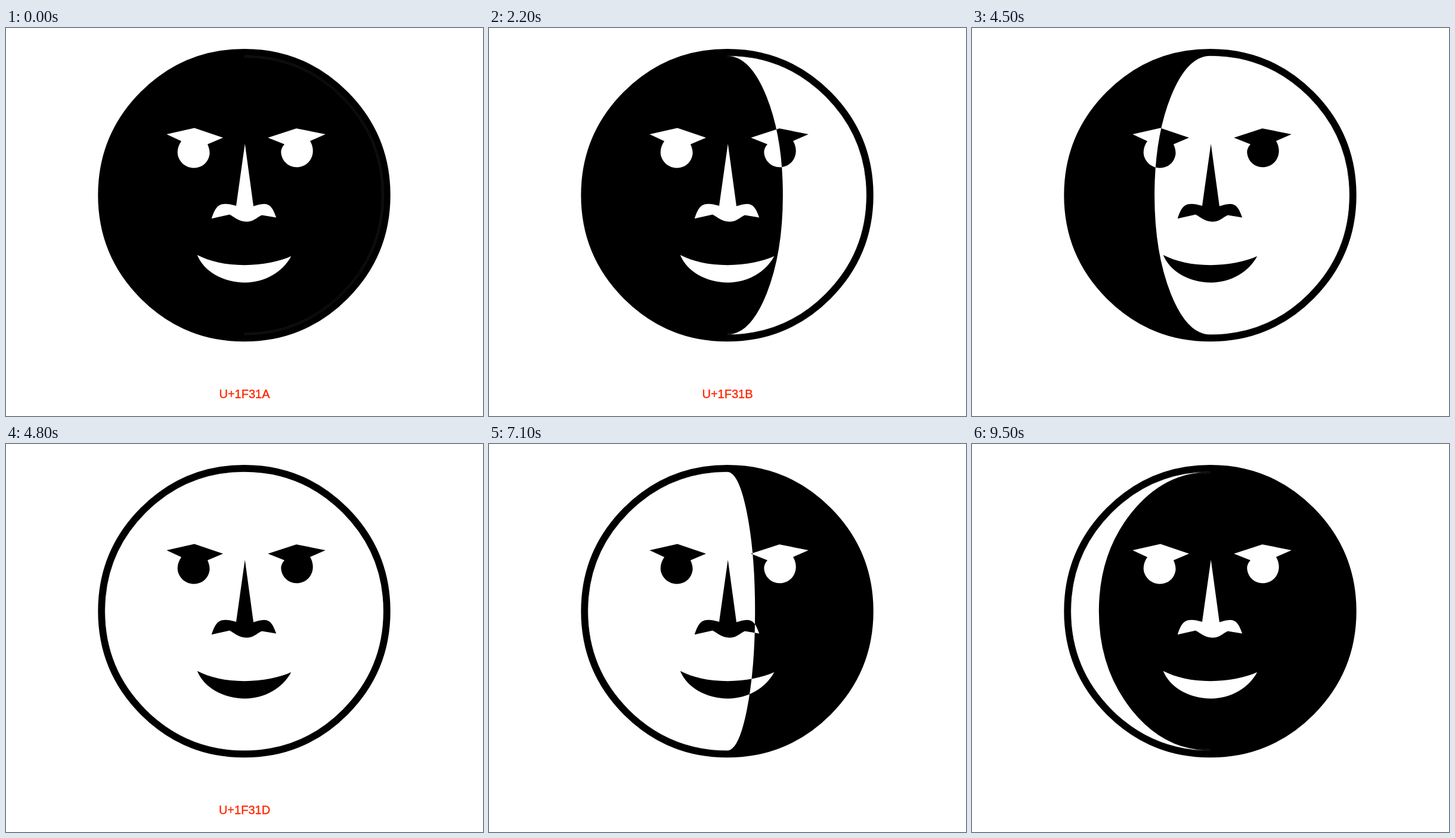
These frames come from a looping animation (800x650 px, 9600 ms). An HTML page:

```html
<!DOCTYPE html>
<html lang="en">
<head>
<meta charset="utf-8">
<title>Moon phases</title>
<style>
  html, body { margin: 0; width: 100%; height: 100%; overflow: hidden; background: #fff; }
  svg { display: block; width: 800px; height: 650px; isolation: isolate; }
  #seam { fill: none; stroke: #333; stroke-width: .6; mix-blend-mode: lighten; }
  text {
    font: 20px "Liberation Sans", Arial, sans-serif;
    text-anchor: middle;
    fill: #ff2600;
    stroke: #ff2600;
    stroke-width: .4;
  }
</style>
</head>
<body>
<svg viewBox="0 0 800 650">
  <rect width="800" height="650" fill="#fff"/>
  <path id="moon" fill-rule="evenodd"/>
  <path id="seam"/>
  <text id="label" x="400" y="620"></text>
</svg>
<script>
(() => {
  const CX = 399.5, CY = 280.1, OUTER = 245.2, INNER = 233.4;
  const STEPS = 20, HOLD = 2000, TICK = 100, LOOP = 9600;
  const LABELS = { 0: 'U+1F31A', 3: 'U+1F31B', 10: 'U+1F31D', 17: 'U+1F31C' };

  // Drawn even-odd, so the face inverts wherever the lit area lies under it.
  const FACE = [
    'M269.3 178L316 167.5L364 183.7L338 194.7Q342 204 341.5 211C339.5 226 328 234.4 315 234.4C300 234.4 287.7 222 287.7 208Q287.7 199 294 189.5Z',
    'M535.8 178L487 168.2L439.3 183.7L467 194.7Q461.3 201 461.3 208C462 222 473 233.2 488 233.2C503 233.2 514.7 221 514.7 206Q514.7 197 510 189.2Z',
    'M400.7 194L415 298.5C421 297 426 294.7 433 294.7C445 295 449 306 453.3 317.5L429 313.4C418 319 415 324.4 403 324.4C391 324.4 385 318 375 312.5L344.8 319.3C349 307 353 294.7 367 294.7C375 294.7 380 296 386 298Z',
    'M320.7 380.3C342 391 368 397.2 400 397.2C430 397.2 459 391 478.3 382.3C464 409 434 426.4 401 426.4C364 426.4 332 408 320.7 380.3Z'
  ].join('');

  const byId = id => document.getElementById(id);
  const pt = (x, y) => `${(CX + x).toFixed(2)} ${(CY + y).toFixed(2)}`;

  // Half ellipse of four quadratic curves; dir 1 runs downwards, -1 upwards.
  function half(rx, ry, dir) {
    const a = Math.tan(Math.PI / 8), s = Math.SQRT1_2, v = ry * dir;
    return [[a, -1, s, -s], [1, -a, 1, 0], [1, a, s, s], [a, 1, 0, 1]]
      .map(([x1, y1, x2, y2]) => `Q${pt(x1 * rx, y1 * v)} ${pt(x2 * rx, y2 * v)}`)
      .join('');
  }

  const moveTop = r => 'M' + pt(0, -r);
  const DISC = moveTop(OUTER) + half(OUTER, OUTER, 1) + half(-OUTER, OUTER, -1) + 'Z';

  function draw(step) {
    const side = step < STEPS / 2 ? 1 : -1;
    const edge = INNER * (1 - (step % 10) / 5);
    const lit = moveTop(INNER) + half(side * INNER, INNER, 1) + half(edge, INNER, -1) + 'Z';
    byId('moon').setAttribute('d', DISC + lit + FACE);
    byId('seam').setAttribute('d', [INNER - 1.9, INNER + .4]
      .map(r => moveTop(r) + half(side * r, r, 1)).join(''));
    byId('label').textContent = LABELS[step] || '';
  }

  function stepAt(time) {
    let step = 0;
    for (let left = time % LOOP; step < STEPS - 1; step++) {
      left -= LABELS[step] ? HOLD : TICK;
      if (left < 0) break;
    }
    return step;
  }

  let shown = 0;
  const start = performance.now();
  function tick() {
    const step = stepAt(performance.now() - start);
    if (step !== shown) draw(shown = step);
    requestAnimationFrame(tick);
  }
  draw(0);
  requestAnimationFrame(tick);
})();
</script>
</body>
</html>
```
